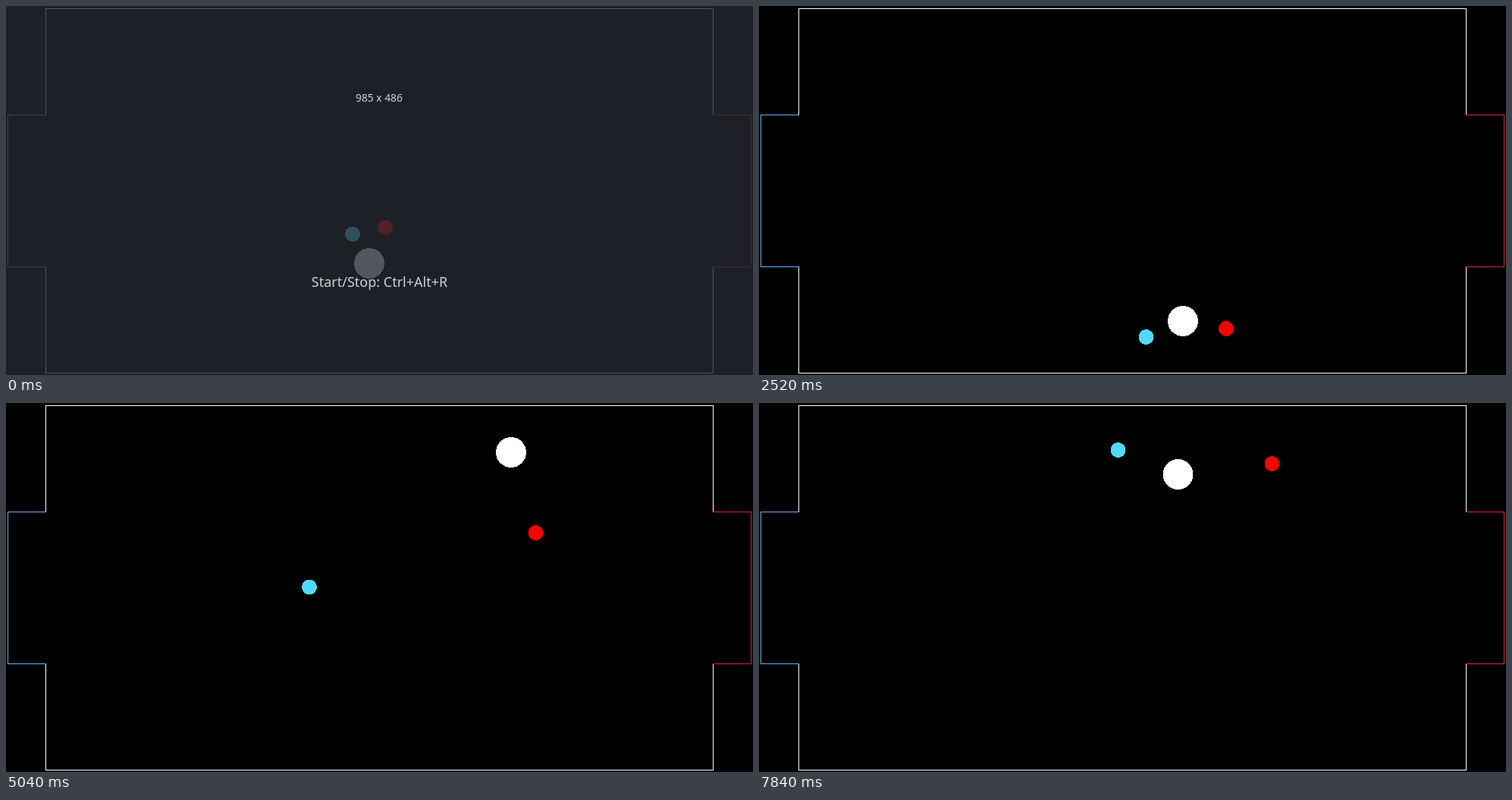
Recreate the animation shown at these times as an HTML page. Size 985 by 486 pixels, loop 8000 ms.

```html
<!DOCTYPE html>
<html lang="en">
<head>
<meta charset="utf-8">
<title>Ball game</title>
<style>
  html, body { margin: 0; width: 100%; height: 100%; overflow: hidden; background: #000; }
  svg { display: block; width: 985px; height: 486px; }
  path { fill: none; stroke-width: 1; }
  path, circle { shape-rendering: crispEdges; }
  text { font-family: Ubuntu, "Noto Sans", "Open Sans", sans-serif; fill: #d0d2d4; text-anchor: middle; }
</style>
</head>
<body>
<svg viewBox="0 0 985 486" xmlns="http://www.w3.org/2000/svg">
  <rect width="985" height="486" fill="#000"/>
  <path stroke="#fff" d="M52.5 143V3.5H932.5V143M52.5 344V483.5H932.5V344"/>
  <path stroke="#5fb4f9" d="M53 143.5H2.5V343.5H53"/>
  <path stroke="#e0262f" d="M932 143.5H982.5V343.5H932"/>
  <circle id="blue" r="10" fill="#4fdaff"/>
  <circle id="red" r="10" fill="#f00"/>
  <circle id="ball" r="20" fill="#fff"/>
  <g id="overlay">
    <rect width="985" height="486" fill="#262a32" opacity=".79"/>
    <text x="492" y="126" font-size="13.8">985 x 486</text>
    <text x="492.5" y="370" font-size="18">Start/Stop: Ctrl+Alt+R</text>
  </g>
</svg>
<script>
const LOOP = 8000, OVERLAY_END = 20;
const STEP = 140, LEAD = 20;      // the picture advances once per step
const TOP = 23, BOTTOM = 466;     // limits for the ball's centre

// Turning points of each path: step, x, y.
// The ball's path runs on past the walls; bounce() folds it back.
const paths = {
  blue: [
    [0, 457, 300.5], [5, 459.5, 379.5], [8, 472.5, 435], [12, 521, 460],
    [15, 526, 464], [18, 510.5, 436], [24, 528.5, 387], [26, 506, 374],
    [36, 400, 242.5], [42, 334, 156], [46, 359, 118], [52, 442, 45], [56, 473.5, 62]
  ],
  red: [
    [0, 500, 291.5], [5, 516, 368], [8, 533, 424.5], [12, 574.5, 453],
    [16, 626, 438], [18, 616, 425], [24, 619.5, 329], [36, 698.5, 171],
    [40, 734, 124], [46, 720, 82.5], [56, 676.5, 80]
  ],
  ball: [
    [0, 479, 339], [5, 486.5, 441], [8, 511, 482], [12, 547.5, 466],
    [18, 559, 415], [24, 573.5, 311], [36, 666, 65], [38, 675, 17],
    [42, 651, -16], [46, 608, 11], [56, 552.5, 94]
  ]
};

// The ball rebounds from the top wall and rolls along the bottom one.
const bounce = y => Math.min(BOTTOM, TOP + Math.abs(y - TOP));

function tangent(pts, i, axis) {
  const a = pts[Math.max(0, i - 1)], b = pts[Math.min(pts.length - 1, i + 1)];
  return (b[axis] - a[axis]) / (b[0] - a[0]);
}

// Smooth curve through the points
function along(pts, step, axis) {
  let i = 0;
  while (i < pts.length - 2 && step >= pts[i + 1][0]) i++;
  const p = pts[i], q = pts[i + 1], h = q[0] - p[0];
  const u = (step - p[0]) / h, v = 1 - u;
  return v * v * (1 + 2 * u) * p[axis] + u * u * (3 - 2 * u) * q[axis]
    + h * u * v * (v * tangent(pts, i, axis) - u * tangent(pts, i + 1, axis));
}

const byId = id => document.getElementById(id);

function place(id, x, y) {
  byId(id).setAttribute("cx", x.toFixed(2));
  byId(id).setAttribute("cy", y.toFixed(2));
}

function draw(ms) {
  const step = Math.floor((ms + LEAD) / STEP);
  for (const id in paths) {
    const x = along(paths[id], step, 1), y = along(paths[id], step, 2);
    place(id, x, id === "ball" ? bounce(y) : y);
  }
  byId("overlay").style.display = ms < OVERLAY_END ? "" : "none";
}

function loop() {
  draw(performance.now() % LOOP);
  requestAnimationFrame(loop);
}
draw(0);
requestAnimationFrame(loop);
</script>
</body>
</html>
```
